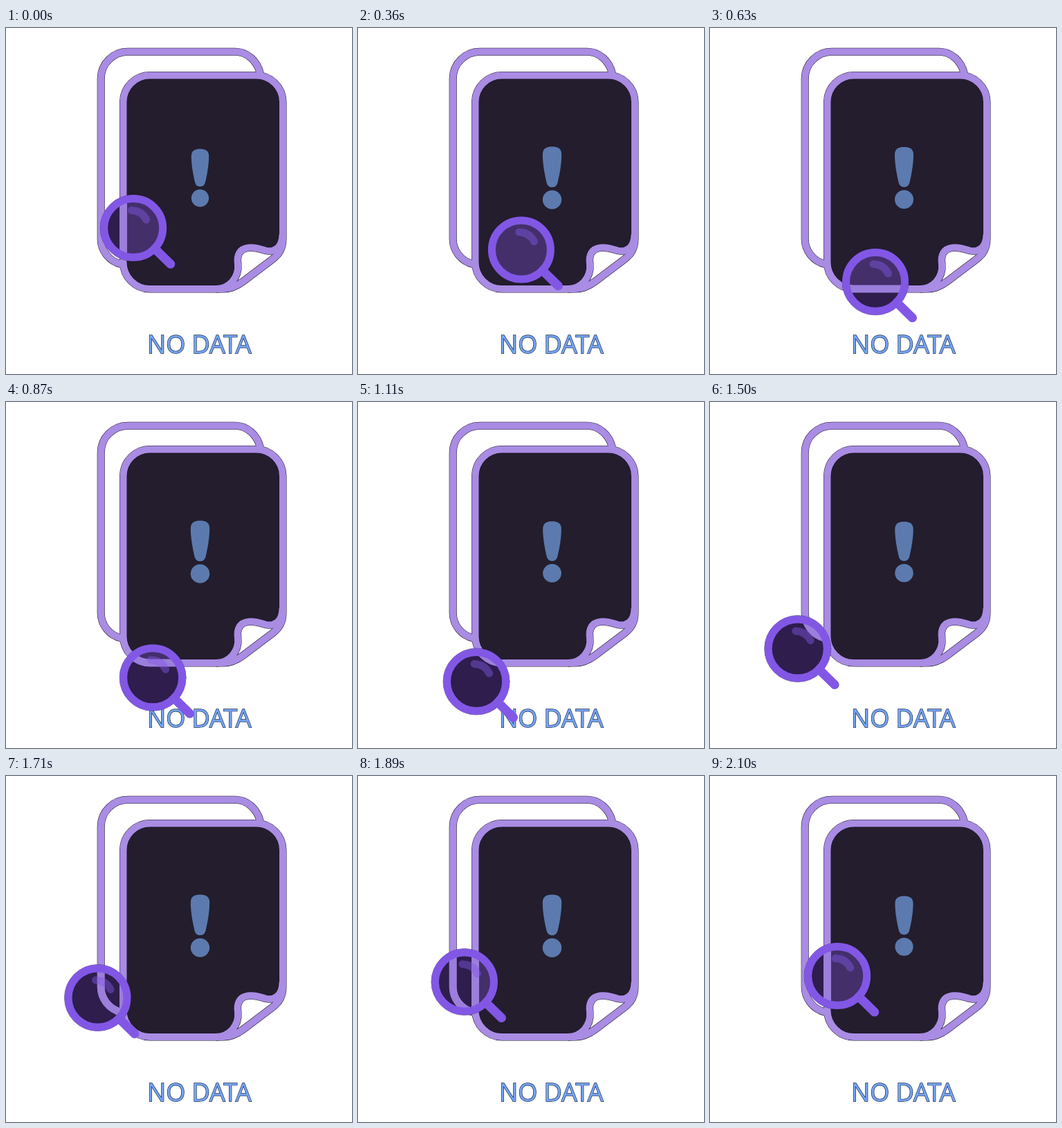
Write an HTML page that moves like this. It is 500 by 500 pixels and loops after 2.13 s.

```html
<!DOCTYPE html>
<html lang="en">
<head>
<meta charset="utf-8">
<title>No data</title>
<style>
html, body { margin: 0; height: 100%; overflow: hidden; background: #fff; }
svg { display: block; width: 100%; height: 100%; --page: #231d2d; --edge: #a98ce3; --fringe: #1c1528; }
.tint { --page: #442f6b; --edge: #9c7edb; --fringe: #9c7edb; }
.fringe { stroke: var(--fringe); stroke-width: 11; }
.edge { stroke: var(--edge); stroke-width: 10; }
text { font: 36px "Open Sans", "Noto Sans", sans-serif; fill: #74a5f6; stroke: #1d2b4a; stroke-width: 1.3; paint-order: stroke; }
</style>
</head>
<body>
<svg viewBox="0 0 500 500">
  <defs>
    <g id="outline" fill="none">
      <path d="M367.5 66C363 47 348 34.3 331 34.3H176A39 39 0 0 0 137.2 73V305C137.2 322 149 337 167 341.5"/>
      <path d="M400 305V107A38.5 38.5 0 0 0 361.500 68.500H208A38.500 38.500 0 0 0 169.500 107V338.500A38.500 38.500 0 0 0 208 377H314C326 377 335 372 343 366L386 333.500C396 326 400 317 400 305"/>
      <path id="curl" d="M399.500 298C399.500 318 387 324.500 375 321.500C366 319 360 316 350 317.500C338 319 333 328 335 341C337 361 322 377 303 377"/>
    </g>
    <g id="sheets">
      <path fill="var(--page)" d="M399.500 298C399.500 318 387 324.500 375 321.500C366 319 360 316 350 317.500C338 319 333 328 335 341C337 361 322 377 303 377H208A38.500 38.500 0 0 1 169.500 338.500V107A38.500 38.500 0 0 1 208 68.500H361.500A38.500 38.500 0 0 1 400 107Z"/>
      <use href="#outline" class="fringe"/>
      <use href="#outline" class="edge"/>
    </g>
    <clipPath id="glass"><circle id="hole" r="38"/></clipPath>
  </defs>

  <use href="#sheets"/>
  <g id="mark" fill="#5c7aae">
    <path d="M0-45.500C8-45.500 13.800-43 13.800-34C13.800-20 10.500-3 8 7C6.500 12 3.500 13.500 0 13.500S-6.500 12-8 7C-10.500-3-13.800-20-13.800-34C-13.800-43-8-45.500 0-45.500Z"/>
    <circle cy="31.700" r="13.800"/>
  </g>
  <text x="204" y="470">NO DATA</text>

  <g class="tint" clip-path="url(#glass)">
    <rect width="500" height="500" fill="#2e1d4d"/>
    <use href="#sheets"/>
  </g>
  <g id="lens" fill="none" stroke="#8257e5" stroke-linecap="round">
    <circle r="48" stroke="#1c1528" stroke-opacity=".6" stroke-width="1"/>
    <path d="M31 30L53.500 52" stroke-width="13"/>
    <circle r="42.500" stroke-width="11"/>
    <path d="M-3-25.500Q12-25 18.500-12" stroke-width="11" stroke-opacity=".45"/>
  </g>
</svg>
<script>
const LOOP = 2130, STEP = 30, TURN = 2070, PULSE = TURN / 4;
const [hole, lens, mark] = ["hole", "lens", "mark"].map(id => document.getElementById(id));
const start = performance.now();

function draw(now) {
  const t = Math.floor(Math.max(0, now - start) % LOOP / STEP) * STEP;

  // The lens circles once, then rests briefly before the loop restarts.
  const angle = 2 * Math.PI * Math.min(t / TURN, 1);
  const x = 184.2 + 58.2 * Math.sin(angle);
  const y = 347.3 - 58.2 * Math.cos(angle);
  for (const part of [hole, lens]) part.setAttribute("transform", `translate(${x} ${y})`);

  const swell = Math.abs(Math.sin(Math.PI * t / PULSE)) ** 0.6;
  mark.setAttribute("transform", `translate(280.5 216.7) scale(${0.92 + 0.08 * swell})`);
  requestAnimationFrame(draw);
}
draw(start);
</script>
</body>
</html>
```
